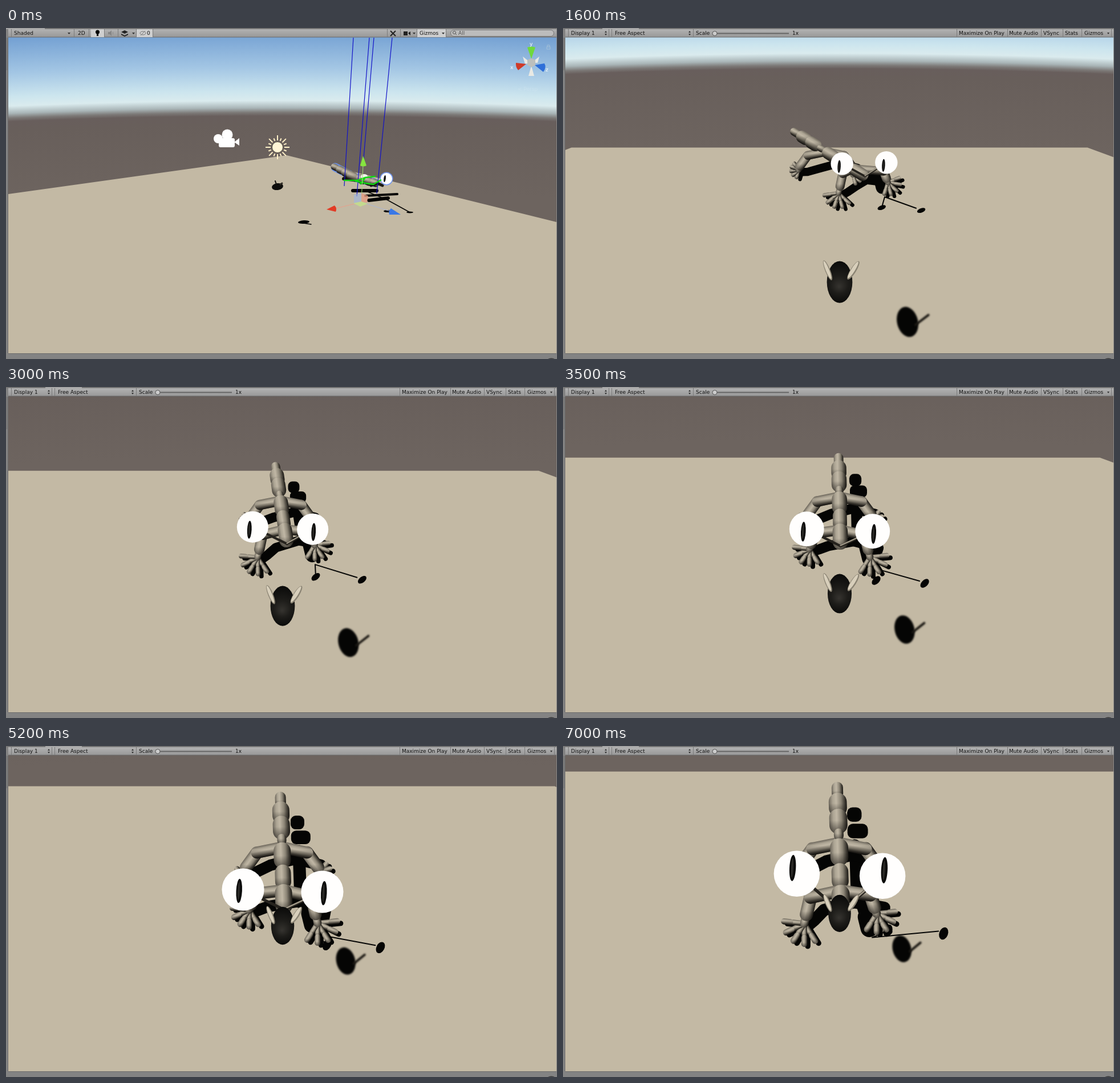
An HTML page with a canvas for the animation above (7.1 s loop, 966 by 580 pixels).

```html
<!DOCTYPE html>
<html lang="en">
<head>
<meta charset="utf-8">
<title>Lizard rig</title>
<style>
html, body { margin: 0; width: 100%; height: 100%; overflow: hidden; background: #828282; }
canvas, svg { position: absolute; left: 0; top: 0; width: 966px; height: 580px; display: block; }
text { font: 9px "DejaVu Sans", sans-serif; fill: #111; white-space: pre; }
#axes text { fill: #fff; }
</style>
</head>
<body>
<canvas id="view" width="966" height="580"></canvas>
<svg viewBox="0 0 966 580">
  <defs>
    <linearGradient id="bar" x2="0" y2="1"><stop stop-color="#b2b2b2"/><stop offset="1" stop-color="#989898"/></linearGradient>
  </defs>
  <path d="M0 0H4V580H0ZM965 0H966V580H965ZM0 570H966V580H0Z" fill="#838383"/>
  <path d="M1.5 17V74M3.5 17V570M4 570.5H965" stroke="#6c6c6c" fill="none"/>
  <ellipse cx="956" cy="581" rx="6" ry="2.5" fill="#3a3a3a"/>
  <rect width="966" height="2" fill="#757575"/>
  <rect x="4" y="2" width="961" height="14" fill="url(#bar)"/>
  <path d="M4 16H965" stroke="#696969"/>

  <g id="editor">
    <rect width="68" height="2" fill="#a5a5a5"/>
    <path d="M149 2h23v14h-23ZM229 2h28v14h-28ZM721 2h50v14h-50Z" fill="#cfcfcf"/>
    <path d="M9.5 2v14M119.5 2v14M145.5 2v14M172.5 2v14M196.5 2v14M228.5 2v14M257.5 2v14M668.5 2v14M691.5 2v14M720.5 2v14M771.5 2v14" stroke="#7b7b7b"/>
    <path d="M108 8h5l-2.5 3ZM221 8h5l-2.5 3ZM713 8h5l-2.5 3ZM764 8h5l-2.5 3Z" fill="#333"/>
    <text x="14" y="12">Shaded</text><text x="126" y="12">2D</text>
    <text x="725" y="12">Gizmos</text>
    <circle cx="160.5" cy="7" r="3.5"/><rect x="159" y="10" width="3" height="4"/>
    <path d="M179 7h3l3-3v10l-3-3h-3ZM187 6q2 3 0 6" fill="#858585"/>
    <path d="M202 7l6-3 6 3-6 3ZM202 10l6 3 6-3v2l-6 3-6-3Z" fill="#222"/>
    <ellipse cx="240" cy="9" rx="5" ry="3" fill="none" stroke="#777"/><path d="M236 13l8-8" stroke="#777"/>
    <text x="247" y="12">0</text>
    <path d="M674 5l9 9M683 5l-9 9" stroke="#222" stroke-width="2"/>
    <path d="M697 6h7v7h-7ZM705 9l4-3v7Z" fill="#222"/>
    <rect x="779.5" y="3.5" width="181" height="11" rx="5.5" fill="#bcbcbc" stroke="#777"/>
    <circle cx="786" cy="8" r="2.5" fill="none" stroke="#555"/><path d="M788 10l2 2" stroke="#555"/>
    <text x="793" y="12" style="fill:#555">All</text>

    <g fill="#fff"><circle cx="372" cy="194" r="8"/><circle cx="388" cy="187" r="9.5"/><rect x="373" y="193" width="28" height="16" rx="3"/><path d="M400 200l9-7v13Z"/></g>
    <circle cx="476" cy="209" r="9.5" fill="#fff5d6" stroke="#5b5346"/>
    <g id="rays" stroke="#fff0c8" stroke-width="2"></g>
    <path d="M609 17L593 277M637 17L615 295M645 17L626 240M677 17L650 290" stroke="#1212c8" stroke-width="1.2"/>
    <path d="M592 267h24l14-5 18-2M612 268l18 4 14 2 14-8M630 262l-9 12" stroke="#12d912" stroke-width="2.5" fill="none"/>
    <path d="M626 240L623 305" stroke="#a3dd77"/><path d="M623 305L579 316" stroke="#e8a08b"/><path d="M623 305L673 321" stroke="#a9b5d6"/>
    <path d="M610 292l13-3v16l-13 3Z" fill="#9fb6df" opacity=".65"/><path d="M623 289l12 5-2 12-10-1Z" fill="#e59c83" opacity=".8"/><path d="M609 307l14-3 11 4-13 5Z" fill="#c3de8c" opacity=".9"/>
    <path d="M626 224l6 17q-6 3-11 0Z" fill="#86e53f"/>
    <path d="M562 318l14-7q5 5 2 11Z" fill="#e23b25"/><path d="M692 327l-17-11q-5 5-3 11Z" fill="#3a78e6"/>

    <g id="axes">
      <path d="M906 50l14 11-10 2ZM935 50l-14 11h11ZM916 84l5-18 5 18Z" fill="#e9e9e4"/>
      <path d="M914 56l7-3 7 3v9l-7 4-7-4Z" fill="#bcbfbd"/>
      <path d="M914 34q7-3 14 0l-7 20Z" fill="#6fd83c"/>
      <path d="M894 61l18 2-14 11q-5-6-4-13Z" fill="#cf3a28"/><path d="M927 65l17-3q4 7-2 15Z" fill="#2f6fd8"/>
      <text x="918" y="31">y</text><text x="884" y="72">x</text><text x="946" y="76">z</text>
      <text x="897" y="110" opacity=".14">&lt; Persp</text>
      <path d="M948 33h6v4h-6ZM949 33v-3h4v3" fill="none" stroke="#b9cbd9" opacity=".6"/>
    </g>
  </g>

  <g id="game">
    <rect x="69" width="64" height="2" fill="#a5a5a5"/>
    <path d="M9.5 2v14M80.5 2v14M85.5 2v14M228.5 2v14M690.5 2v14M779.5 2v14M838.5 2v14M876.5 2v14M909.5 2v14M961.5 2v14" stroke="#7b7b7b"/>
    <path d="M73 8h4l-2-3ZM73 10h4l-2 3ZM220 8h4l-2-3ZM220 10h4l-2 3ZM954 8h4l-2 3Z" fill="#333"/>
    <path d="M266 9.5H396" stroke="#666" stroke-width="2"/><circle cx="266" cy="9.5" r="4" fill="#ccc" stroke="#555"/>
    <text x="14" y="12">Display 1</text><text x="91" y="12">Free Aspect</text><text x="233" y="12">Scale</text><text x="402" y="12">1x</text>
    <text x="694" y="12">Maximize On Play</text><text x="782" y="12">Mute Audio</text><text x="842" y="12">VSync</text><text x="880" y="12">Stats</text><text x="914" y="12">Gizmos</text>
  </g>
</svg>
<script>
const LOOP = 7100, STEP = 100, PLAY = 900;
const GROUND = '#c3b9a4', DARK = '#050504';
const $ = id => document.getElementById(id);
const c = $('view').getContext('2d');
const mix = (a, b, u) => a + (b - a) * u;
const mixPt = (p, q, u) => [mix(p[0], q[0], u), mix(p[1], q[1], u)];
const add = (p, x, y) => [p[0] + x, p[1] + y];

function line(pts, width, color) {
  c.lineWidth = width;
  c.strokeStyle = color;
  c.beginPath();
  pts.forEach(p => c.lineTo(...p));
  c.stroke();
}

function oval(x, y, rx, ry, color, deg = 0) {
  c.fillStyle = color;
  c.beginPath();
  c.ellipse(x, y, rx, ry, deg * Math.PI / 180, 0, 7);
  c.fill();
}

function poly(color, ...pts) {
  c.fillStyle = color;
  c.beginPath();
  pts.forEach(p => c.lineTo(...p));
  c.fill();
}

function blurred(px, draw) {
  c.filter = `blur(${px}px)`;
  draw();
  c.filter = 'none';
}

function ramp(g, stops) {
  stops.forEach(s => g.addColorStop(...s));
  return g;
}

// Rounded limb lit from the upper left, darker towards its lower end
function limb(p, q, r) {
  const dx = q[0] - p[0], dy = q[1] - p[1], len = Math.hypot(dx, dy) || 1;
  const side = -dy * .75 + dx * .66 < 0 ? -1 : 1;
  const nx = -dy / len * side * r, ny = dx / len * side * r;
  const [mx, my] = mixPt(p, q, .5);
  line([p, q], 2 * r, ramp(c.createLinearGradient(mx - nx, my - ny, mx + nx, my + ny),
    [[0, '#6d675c'], [.22, '#aca493'], [.42, '#c0b7a5'], [.68, '#8c8576'], [.88, '#423e36'], [1, '#1a1814']]));
  const low = Math.max(p[1], q[1]) + r;
  line([p, q], 2 * r, ramp(c.createLinearGradient(0, low - 1.5 * r, 0, low),
    [[0, 'rgba(12,10,8,0)'], [1, 'rgba(12,10,8,.6)']]));
}

// Horizon seen as the top of a very large disc
function sky(h) {
  const R = 11600, low = 140, high = 150;
  const stops = [[-140, '#6d645f'], [-20, '#685f5b'], [-5, '#685e5c'], [1, '#7c7977'], [9, '#a9b5b7'], [22, '#daebee'], [38, '#cce5ee'], [80, '#a3c6e4'], [150, '#6d9bd0']];
  c.fillStyle = ramp(c.createRadialGradient(483, h + R, R - low, 483, h + R, R + high),
    stops.map(([d, color]) => [(d + low) / (low + high), color]));
  c.fillRect(4, 16, 961, 554);
}

// Everything in the game view follows from the seconds `s` since play began:
// `edge` is the far edge of the floor, `d` how far the camera still has to tilt.
function motion(s) {
  const edge = 14 + 205 / (1 + (s / 2.77) ** 2.2), d = edge - 43;
  const u = Math.max(0, s - .7), turn = Math.cos(Math.PI * u / .7);
  return {
    edge, d,
    size: Math.max(.72, 1.06 - .0022 * d),
    sway: turn * Math.exp(-1.6 * u),
    look: u < 1.4 ? turn * (1 - (u / 1.4) ** 4) : 0,
    lift: (s / 6.1) ** 5,
    gait: Math.cos(2 * Math.PI * (s - .7) / 1.4)
  };
}

function buildSpine({ d, size, sway }) {
  const tip = [481 - 73 * sway, 77 + .64 * d], head = [487 + 31 * sway, 271 - .11 * d];
  const along = [0, .13, .28, .4, .56, .78, 1];
  const radii = [9.5, 15, 15, 8, 15, 14, 15], half = [5, 5, 6, 2, 8, 8, 11];
  const len = Math.hypot(head[0] - tip[0], head[1] - tip[1]);
  return along.map((f, i) => {
    const k = half[i] * size / len;
    return { mid: mixPt(tip, head, f), a: mixPt(tip, head, f - k), b: mixPt(tip, head, f + k), r: radii[i] * size };
  });
}

function buildLeg(root, side, front, { size, sway, gait }) {
  const at = (x, y) => add(root, (side * x + (front ? 25 * sway : 0)) * size, y * size);
  const swing = front ? -side * gait : side * gait;
  const knee = front ? at(50, 9 + 3 * swing) : at(44, 9);
  const palm = front ? at(60, 46 + 13 * swing) : at(66, 50 + 6 * swing);
  const ankle = front ? mixPt(knee, palm, .65) : at(63, 35);
  const reach = (front ? 35 : 22) * size * (.92 + .08 * swing);
  const heading = front ? 90 - side * 32 - 15 * sway : 90 - side * 80;
  const tips = [-2, -1, 0, 1, 2].map(k => {
    const a = (heading + k * 32) * Math.PI / 180;
    return add(palm, Math.cos(a) * reach, Math.sin(a) * reach);
  });
  return { root, knee, ankle, palm, tips, size };
}

function drawLeg({ root, knee, ankle, palm, tips, size }) {
  tips.forEach(tip => {
    limb(palm, mixPt(palm, tip, .55), 4.4 * size);
    limb(mixPt(palm, tip, .7), tip, 5 * size);
  });
  limb(ankle, palm, 7 * size);
  limb(knee, ankle, 11 * size);
  limb(root, knee, 10.5 * size);
}

function shadeLeg({ root, knee, ankle, palm, tips, size }) {
  line([add(root, 24, 20), add(knee, 24, 22), add(ankle, 14, 10), add(palm, 6, 4)], 20 * size, DARK);
  tips.forEach(tip => line([add(palm, 6, 4), add(tip, 6, 4)], 9 * size, DARK));
}

function shadeSegment({ mid: [x, y], r }, dx, w) {
  const h = r * .8;
  c.fillStyle = DARK;
  c.beginPath();
  c.roundRect(x + dx - w, y + 17 - h, w * 2, h * 2, h * .75);
  c.fill();
}

function drawFloor({ edge, d }) {
  const left = 14 - (206 - edge) * .24, right = 975 - .5 * d + .001 * d * d;
  sky(edge * 1.3 - 206);
  poly(GROUND, [4, edge + Math.max(0, left - 4) * .4], [Math.max(4, left), edge], [Math.min(965, right), edge],
    [965, edge + Math.max(0, 966 - right) * .36], [965, 570], [4, 570]);
}

function drawMouse({ d }) {
  const y = 292 + .82 * d + .0006 * d * d, ry = 32.5 + .025 * d;
  oval(485, y, ry * .61, ry, ramp(c.createRadialGradient(484, y + 8, 1, 485, y, ry),
    [[0, '#34322e'], [.4, '#1e1d1a'], [1, '#0a0a09']]));
  [[-21, -22, 4.5], [24, 32, 5]].forEach(([x, tilt, w]) => {
    oval(485 + x, y - ry * .56, w, ry * .51, '#8a8373', tilt);
    oval(484.5 + x, y - ry * .58, w * .65, ry * .46, '#d8cfbb', tilt);
  });
}

function shadeMouse({ d }) {
  const x = 594 + .06 * d, y = 354 + .8 * d + .001 * d * d, r = 32.5 + .025 * d;
  oval(x, y, r * .5, r * .73, DARK, -14);
  line([[x + 14, y + r * .14], [x + r, y - r * .33]], 4, '#1b1813');
}

function shadeEyes({ d, look, lift, size }) {
  const base = [542 + 22 * look, 336 - .24 * d], drop = 27 - .05 * d - 39 * lift;
  const a = add(base, 28 - .26 * d + 10 * look, drop), b = add(base, 126 - .42 * d + 8 * look, drop + 5);
  line([a, base, add(b, -9, -4)], 2, DARK);
  [a, b].forEach(p => oval(...p, 10.5 * size, 11.5 * size - 4.5, DARK, -70 + .3 * d));
  return base;
}

function drawEyes({ d, look, lift, size }, snout) {
  const r = 40.5 - .125 * d, gap = 75.5 - .22 * d;
  const mid = [485 + 43 * look, 265 - .17 * d - 39 * lift], turned = Math.abs(look);
  const balls = [-1, 1].map(side => add(mid, side * gap, side * (2 - 3 * look)));
  balls.forEach(p => line([snout, p], 5 * size, '#25221d'));
  line([add(snout, 0, -1), add(balls[1], 0, -1)], 2.5 * size, '#a29a89');
  balls.forEach(([x, y], i) => {
    const px = x + (i * 2 - 1) * r * .13 * (1 - turned) - 2 - 6 * turned + 3 * look;
    const py = y + 5 - 15 * lift;
    oval(x, y, r, r, '#fffefd');
    oval(px, py, r * .14, r * .57, '#0c0c0b', 3);
    oval(px - r * .02, py, r * .05, r * .42, '#2a2926', 3);
  });
}

function drawGame(s) {
  const m = motion(s), { size } = m, spine = buildSpine(m);
  const [, tail2, tail3, joint, body1, body2, head] = spine;
  const hip = mixPt(joint.mid, body1.mid, .5), chest = mixPt(body2.mid, head.mid, .6);
  const hind = [-1, 1].map(side => buildLeg(hip, side, false, m));
  const fore = [-1, 1].map(side => buildLeg(chest, side, true, m));

  drawFloor(m);
  blurred(.7, () => {
    if (m.sway < .6) {
      shadeSegment(tail2, 29, 12 * size);
      shadeSegment(tail3, 34, 17 * size);
    }
    const base = shadeEyes(m);
    line([add(joint.mid, 28, 20), add(body1.mid, 30, 18), add(body2.mid, 30, 16), add(base, -8, -30)], 22 * size, DARK);
    line([add(base, -10, -36), add(base, -5, -16)], 29 * size, DARK);
    [...hind, ...fore].forEach(shadeLeg);
  });
  blurred(1.5, () => shadeMouse(m));

  hind.forEach(drawLeg);
  spine.slice(0, 6).forEach(g => limb(g.a, g.b, g.r));
  fore.forEach(drawLeg);
  limb(head.a, head.b, head.r);
  drawEyes(m, mixPt(head.mid, head.b, 1.7));
  drawMouse(m);
}

function drawEditor() {
  sky(149);
  poly(GROUND, [4, 291], [492, 223], [965, 340], [965, 570], [4, 570]);
  blurred(.6, () => {
    line([[608, 285], [650, 285]], 6, DARK);
    line([[630, 294], [686, 291]], 4, DARK);
    line([[636, 302], [670, 298]], 6, DARK);
    line([[634, 287], [668, 301], [708, 323]], 1.5, DARK);
    oval(669, 321, 7, 2, DARK);
    oval(708, 323, 6, 1.5, DARK);
    oval(522, 340, 10, 3, DARK, -4);
    line([[522, 342], [535, 344]], 1.5, DARK);
  });
  const tail = [577, 244], rump = [612, 262], neck = [646, 271];
  line([tail, rump, neck], 15, '#6d8fe0');
  line([[592, 264], [617, 267]], 6, '#17160f');
  for (let i = 0; i < 7; i++) {
    const p = i < 4 ? mixPt(tail, rump, i / 3.5) : mixPt(rump, neck, (i - 3) / 3);
    limb(add(p, -2, -1), add(p, 2, 1), 5.5 + 2.5 * Math.sin(i / 2.2));
  }
  line([[640, 276], [651, 272], [660, 276]], 5, '#1a1914');
  oval(628, 260, 6, 4, '#f4f4ee');
  oval(667, 264, 11.5, 11.5, '#7598ee');
  oval(667, 264, 10, 10, '#fff');
  oval(664, 264, 1.8, 6, '#111', 8);
  oval(476, 278, 10, 6, '#0d0d0b', -8);
  line([[474, 274], [472, 268]], 2, '#12110e');
  line([[481, 274], [484, 272]], 3, '#2c2923');
}

$('rays').innerHTML = Array.from({ length: 16 }, (_, i) =>
  `<path d="M476 197V${i % 2 ? 192 : 188}" transform="rotate(${i * 22.5} 476 209)"/>`).join('');

c.lineCap = c.lineJoin = 'round';
const start = performance.now();
let shown = -1;

function tick() {
  const t = Math.floor((performance.now() - start) % LOOP / STEP) * STEP;
  if (t !== shown) {
    shown = t;
    const playing = t >= PLAY;
    $('editor').style.display = playing ? 'none' : '';
    $('game').style.display = playing ? '' : 'none';
    playing ? drawGame((t - PLAY) / 1000) : drawEditor();
  }
  requestAnimationFrame(tick);
}
tick();
</script>
</body>
</html>
```
